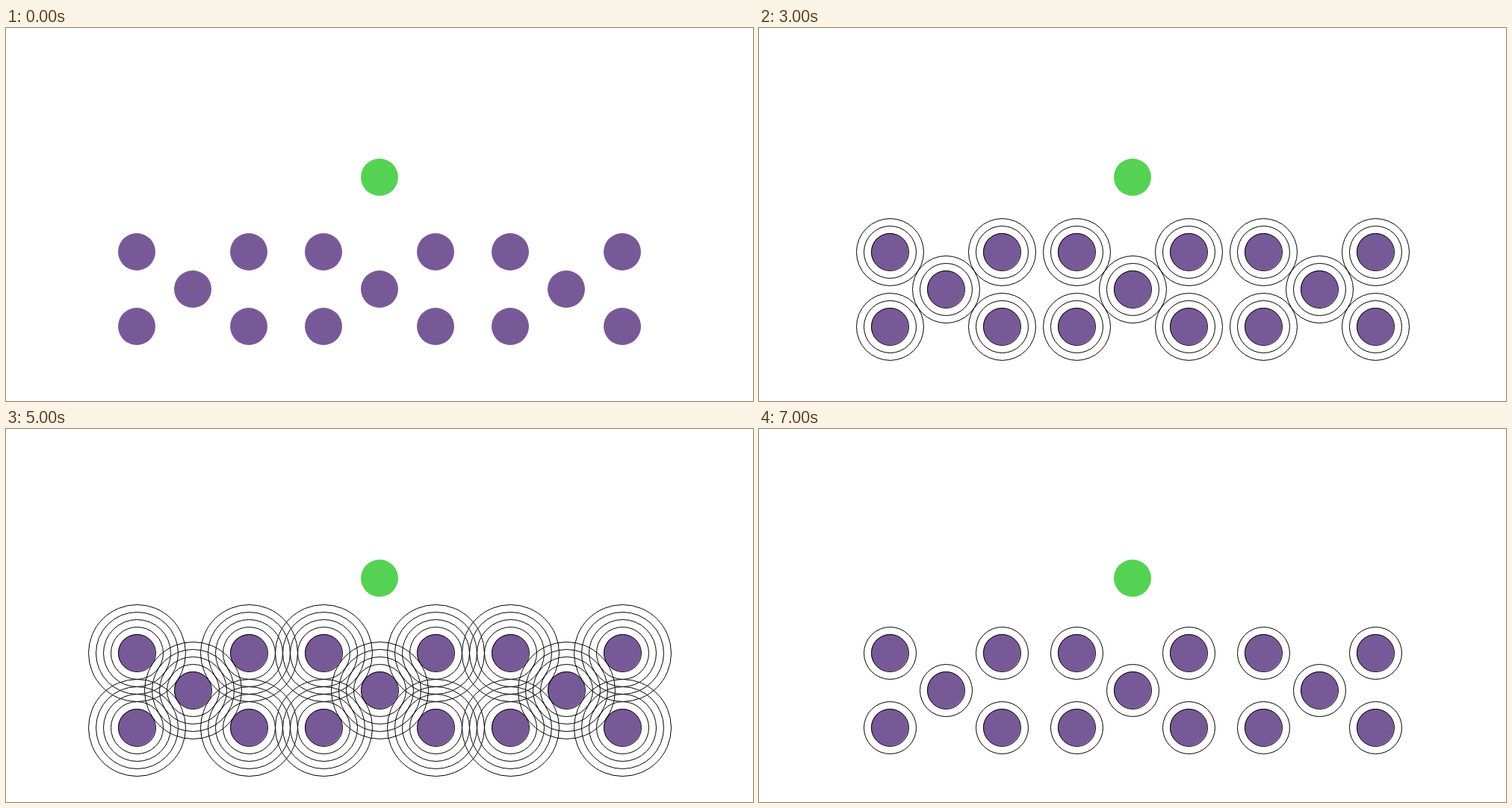
An HTML page with a canvas that plays this animation: 1000 px wide and 500 px high, repeating every 8000 ms.

```html
<!DOCTYPE html>
<html lang="en">
<head>
<meta charset="utf-8">
<title>Rings</title>
<style>
  html, body { margin: 0; width: 100%; height: 100%; overflow: hidden; background: #fff; }
  canvas { display: block; }
</style>
</head>
<body>
<canvas id="stage" width="1000" height="500"></canvas>
<script>
const ctx = document.getElementById("stage").getContext("2d");
const LOOP = 8000, RESET = 5020, STEP = 1000, RADIUS = 25, GAP = 10;

const dots = [250, 500, 750].flatMap(x => [
  [x, 350], [x - 75, 300], [x + 75, 300], [x - 75, 400], [x + 75, 400]
]);

function circle(x, y, r) {
  ctx.beginPath();
  ctx.arc(x, y, r, 0, Math.PI * 2);
}

function disc(x, y, color) {
  circle(x, y, RADIUS);
  ctx.fillStyle = color;
  ctx.fill();
}

// One ring per second; all rings clear shortly after the fifth appears.
function ringCount(t) {
  return t < RESET ? Math.floor(t / STEP) : Math.floor(t / STEP) - 5;
}

function draw(t) {
  ctx.fillStyle = "#fff";
  ctx.fillRect(0, 0, 1000, 500);
  disc(500, 200, "#55d254");
  for (const [x, y] of dots) disc(x, y, "#785997");

  ctx.strokeStyle = "#000";
  ctx.lineWidth = 1;
  const count = ringCount(t);
  for (const [x, y] of dots) {
    for (let i = 0; i < count; i++) {
      circle(x + 0.5, y + 0.5, RADIUS + i * GAP);
      ctx.stroke();
    }
  }
}

let start;
function tick(now) {
  if (start === undefined) start = now;
  draw((now - start) % LOOP);
  requestAnimationFrame(tick);
}
draw(0);
requestAnimationFrame(tick);
</script>
</body>
</html>
```
